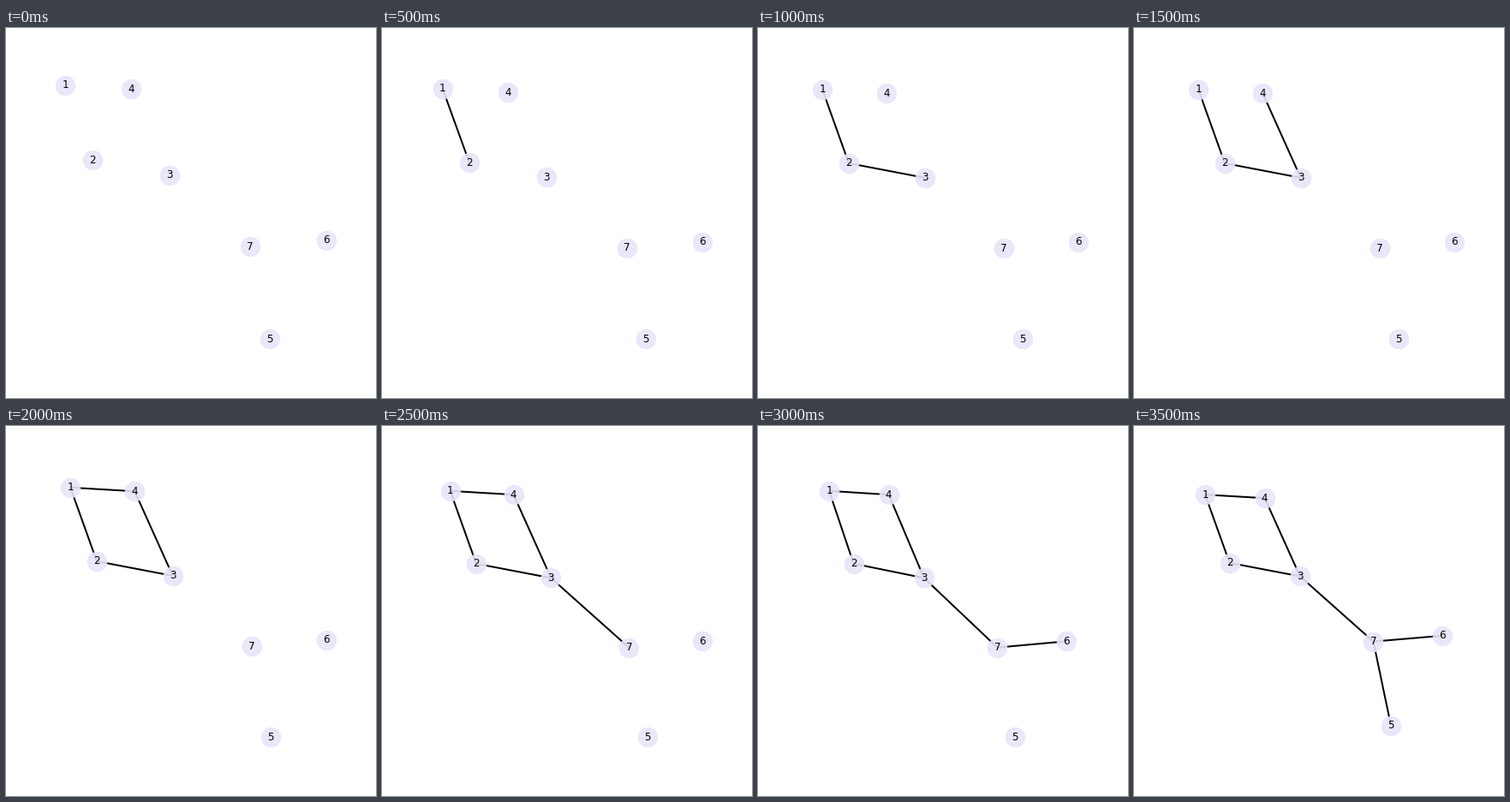
These frames come from a looping animation (432 px wide and 432 px high, 4000 ms). A matplotlib script:

```python
import matplotlib.pyplot as plt
import numpy as np
from matplotlib.animation import FuncAnimation
from matplotlib.collections import LineCollection

PAD = 0.05

# Key points of nodes 1 to 7, scaled to the unit square
nodes = np.array([(0, 1), (0.1033, 0.7045), (0.4004, 0.6463), (0.2516, 0.9848),
                  (0.784, 0), (1, 0.389), (0.7099, 0.3637)])

# A ring through 1 to 4, then a bridge from 3 to the hub 7 and its two leaves
ring = [(n, n % 4 + 1) for n in range(1, 5)]
hub = [(7, n) for n in (3, 6, 5)]
segments = nodes[np.array(ring + hub) - 1]

plt.rcParams["font.family"] = "DejaVu Sans"
fig = plt.figure(figsize=(6, 6), dpi=72, facecolor="white")
ax = fig.add_axes([0.125, 0.125, 0.775, 0.755])
ax.axis("off")

lines = LineCollection([], colors="black", linewidths=2, zorder=1)
ax.add_collection(lines, autolim=False)
ax.scatter(*nodes.T, s=500, c="lavender", alpha=0.9, linewidths=1, zorder=2)
for number, (x, y) in enumerate(nodes, start=1):
    ax.text(x, y, str(number), size=12, color="black",
            ha="center", va="center", zorder=3)


def padded_box(points):
    low, high = points.min(axis=0), points.max(axis=0)
    pad = PAD * (high - low)
    return np.array([low - pad, high + pad])


def draw(step):
    """Show the first `step` edges and refit the view around them."""
    shown = segments[:step]
    lines.set_segments(shown)
    points = nodes
    if step:
        points = np.vstack([nodes, padded_box(shown.reshape(-1, 2))])
    xlim, ylim = padded_box(points).T
    ax.set(xlim=xlim, ylim=ylim)
    return []


anim = FuncAnimation(fig, draw, frames=len(segments) + 1, interval=500,
                     init_func=lambda: draw(0), repeat=True, repeat_delay=0)
plt.show()
```
